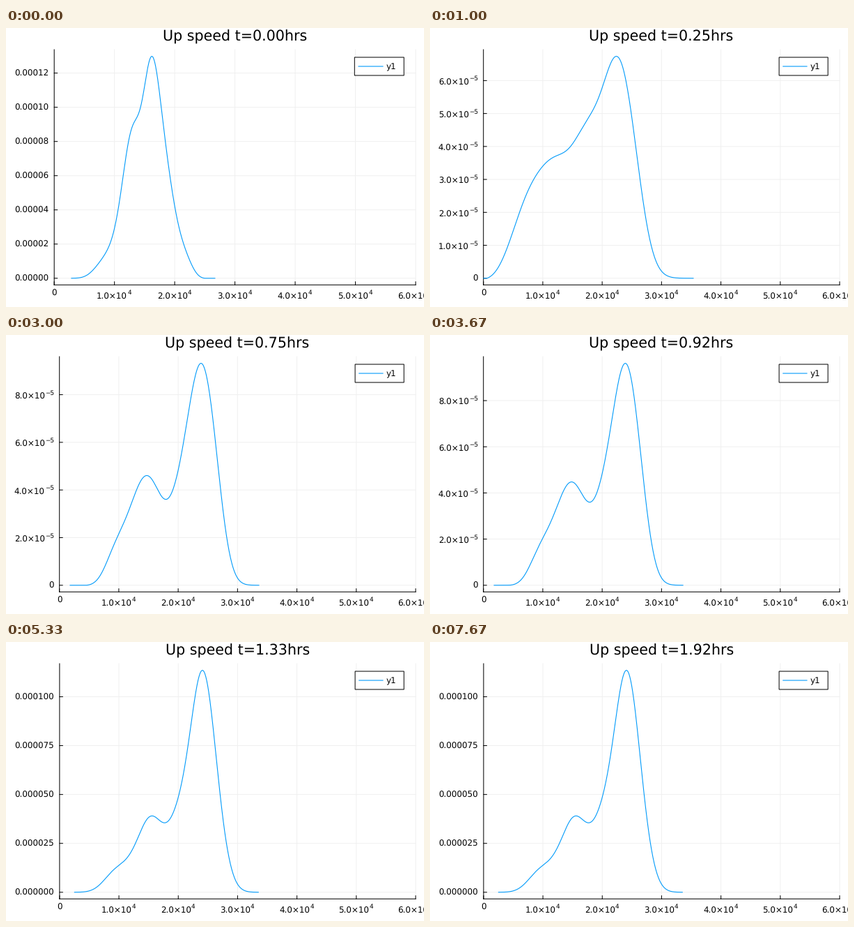
Animation of 600 by 400 pixels, one loop 8 s. Source, as a matplotlib script:

```python
import numpy as np
import matplotlib.pyplot as plt
from matplotlib.animation import FuncAnimation
from matplotlib.patches import Rectangle

plt.rcParams.update({"font.family": "DejaVu Sans", "text.hinting": "none"})

W, H = 600, 400
LOOP, INTERVAL, STEPS = 8000, 40, 24
PT = 0.72  # points per pixel at 100 dpi
TOP, BOTTOM, RIGHT = 31, 368.3, 588
ZERO_Y, PEAK_HEIGHT = 358.8, 318.2
X_MAX = 60  # thousands
LABEL, SMALL, TITLE = 11.9, 8.9, 20.67
BLUE, GRID = "#009afa", "#f0f0f0"
TICK = 4.5


def bell(x, mean, sd):
    return np.exp(-((x - mean) / sd) ** 2 / 2)


def smooth(peak, span, first, step, percents):
    """Sum of equal-width bells passing through a few key heights."""
    centres = first + step * np.arange(len(percents))
    basis = lambda v: bell(v[:, None], centres, 0.85 * step)
    x = np.linspace(*span, 400)
    y = basis(x) @ np.linalg.solve(basis(centres), percents)
    return x, np.maximum(y, 0) * peak / y.max()


def mixture(span, *parts):
    x = np.linspace(*span, 400)
    return x, sum(height * bell(x, mean, sd) for height, mean, sd in parts)


def blend(a, b, t):
    x = np.linspace(a[0][0], a[0][-1], 400)
    return x, (1 - t) * np.interp(x, *a) + t * np.interp(x, *b)


start = smooth(1.298e-4, (2.86, 26.68), 7, 1.5,
               [5.5, 11.3, 22.6, 47.4, 69, 79.5, 100, 83.5, 50.4, 25.7, 11.5, 2.8])
early = mixture((1.5, 36.5), (6.5e-5, 16.5, 4.3), (3e-5, 22, 4))
wide = mixture((0, 42.1), (4.4e-5, 16.5, 6.4), (2.8e-5, 24, 4.3))
shoulder = smooth(6.736e-5, (0, 35.35), 1.95, 2.55,
                  [2.8, 17.4, 36.6, 49.2, 55, 59.5, 70.4, 84.3, 100, 74.3, 25.4])
plateau = smooth(6.413e-5, (0, 35.95), 2.45, 2.55,
                 [1.5, 12.7, 34.3, 49.9, 60.2, 64.7, 71.4, 88.5, 100, 82.1, 36.1])
two_peaks = smooth(9.316e-5, (1.8, 33.6), 7.1, 2.1,
                   [5.5, 18.4, 31.1, 45.5, 48, 39, 48.4, 79, 100, 71.3])
settled = smooth(1.135e-4, (2.52, 33.5), 9.01, 2.16,
                 [9.9, 14.9, 25.4, 34.4, 31.3, 41, 72.2, 100, 63.5])

# Each density holds from its step until the next one.
SCHEDULE = [(0, start), (1, early), (2, wide), (3, shoulder), (5, plateau),
            (9, two_peaks), (11, blend(two_peaks, settled, 0.15)),
            (12, blend(two_peaks, settled, 0.75)), (13, settled)]


def axis_style(peak):
    """Tick step, decimals (None for powers of ten) and left edge."""
    if peak > 1.2e-4:
        return 2e-5, 5, 69.2
    if peak > 1e-4:
        return 2.5e-5, 6, 76.9
    return (2e-5 if peak > 7e-5 else 1e-5), None, 76.7


def build_page(fig, step):
    """Draw the whole chart for one time step on its own axes."""
    ax = fig.add_axes([0, 0, 1, 1], xlim=(0, W), ylim=(H, 0))
    ax.axis("off")

    def line(x, y, color="black", width=1.0, **kw):
        ax.plot(x, y, color=color, lw=width * PT, snap=False, **kw)

    def text(x, y, s, size=LABEL, ha="left"):
        ax.text(x, y, s, fontsize=size * PT, ha=ha, va="baseline", color="black")

    def power(x, y, mantissa, exponent):
        text(x, y, f"{mantissa:.1f}×10")
        text(x + 3.7 * LABEL, y - 6.2, exponent, SMALL)

    x, y = [curve for first, curve in SCHEDULE if first <= step][-1]
    peak = y.max()
    tick_step, decimals, left = axis_style(peak)
    to_x = lambda v: left + (RIGHT - left) * v / X_MAX
    to_y = lambda v: ZERO_Y - PEAK_HEIGHT * v / peak
    x_ticks = [to_x(10 * i) for i in range(7)]
    y_ticks = [to_y(tick_step * i) for i in range(int(peak * 1.03 / tick_step) + 1)]

    for tx in x_ticks:
        line([tx, tx], [TOP, BOTTOM], GRID)
    for ty in y_ticks:
        line([left, RIGHT], [ty, ty], GRID)
    line([left, RIGHT], [BOTTOM, BOTTOM])
    line([left, left], [TOP, BOTTOM])

    for i, tx in enumerate(x_ticks):
        line([tx, tx], [BOTTOM, BOTTOM - TICK])
        if i:
            power(tx - 25.5, 388.6, i, "4")
        else:
            text(tx, 384, "0", ha="center")
    for i, ty in enumerate(y_ticks):
        line([left, left + TICK], [ty, ty])
        if decimals:
            text(left - 7.6, ty + 4.4, f"{i * tick_step:.{decimals}f}", ha="right")
        elif i:
            power(11.8, ty + 6.2, i * tick_step * 1e5, "−5")
        else:
            text(left - 7.6, ty + 4.4, "0", ha="right")

    line(to_x(x), to_y(y), BLUE, 1.1)
    text((left + RIGHT) / 2 - 0.3, 18.2, f"Up speed t={step / 12:.2f}hrs", TITLE, "center")

    box_left = 500.3 if left < 70 else 501.1
    ax.add_patch(Rectangle((box_left, 42), 571.2 - box_left, 26, fc="white",
                           ec="black", lw=PT, snap=False, zorder=3))
    line([box_left + 5.7, 541], [55, 55], BLUE, 1.1, zorder=4)
    text(546, 59.5, "y1")
    return ax


fig = plt.figure(figsize=(W / 100, H / 100), dpi=100, facecolor="white")
pages = [build_page(fig, step) for step in range(STEPS)]


def draw(frame):
    # Steps last a third of a second, so start each on the nearest earlier tick.
    current = int((frame + 0.7) * INTERVAL * STEPS / LOOP)
    for step, page in enumerate(pages):
        page.set_visible(step == current)
    return pages


anim = FuncAnimation(fig, draw, frames=LOOP // INTERVAL, interval=INTERVAL,
                     init_func=lambda: draw(0), repeat=True, repeat_delay=0, blit=False)
plt.show()
```
